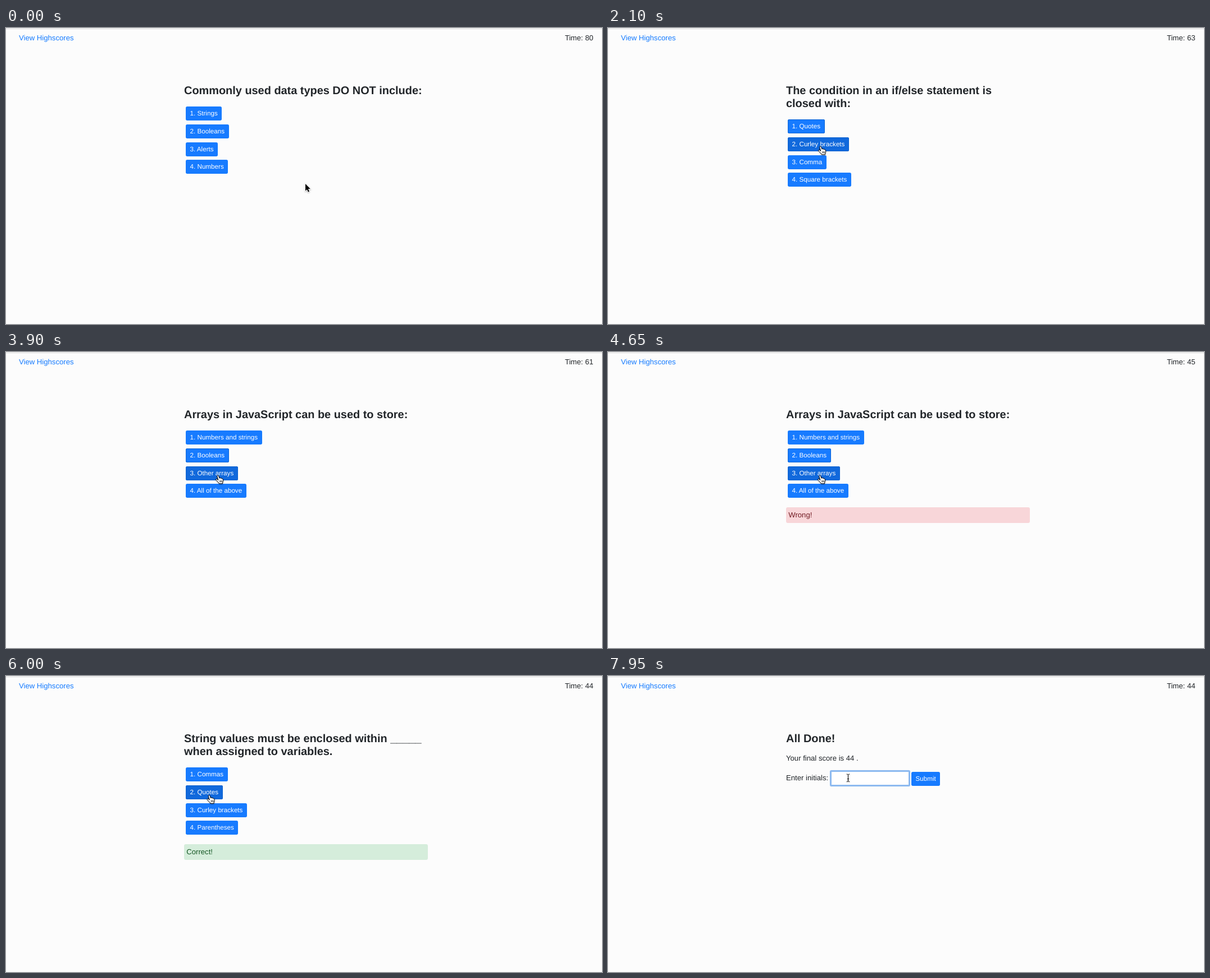
Recreate the animation shown at these times as an HTML page. Size 1061 px wide and 528 px high, loop 8000 ms.

```html
<!DOCTYPE html>
<html lang="en">
<head>
<meta charset="utf-8">
<title>Code quiz</title>
<style>
html, body { margin: 0; width: 100%; height: 100%; overflow: hidden; }
body {
  position: relative; background: #fcfcfc; color: #212529;
  font: 13.14px/20px "Liberation Sans", Arial, sans-serif;
  text-rendering: geometricPrecision;
}
body * { position: absolute; white-space: pre; box-sizing: border-box; }
br { position: static; }
svg * { position: static; }
.rule { top: 1px; width: 100%; height: 1px; background: #d6d6d6; }
.link { left: 23px; top: 7.5px; color: #157bff; }
.timer { right: calc(100% - 1045.5px); top: 7.5px; }
h2 { left: 317px; top: 100.5px; margin: 0; font-size: 19.92px; line-height: 23px; }
.btn {
  left: 320px; height: 25px; padding: 0 7.5px; border-radius: 2.7px;
  background: #177bff; color: #fff; font-size: 11.67px; line-height: 25px;
}
.edge { box-shadow: inset 0 0 0 1px #0f66d6; }
.hover { background: #1169dc; box-shadow: inset 0 0 0 1px #0d62cf; }
.alert {
  left: 317px; width: 434px; height: 28px; padding-left: 4.3px;
  border-radius: 3.3px; line-height: 27px;
}
.wrong { background: #f8d6d9; color: #721c24; }
.right { background: #d5eddb; color: #155724; }
.score { left: 317px; top: 136.5px; }
.label { left: 317px; top: 171.8px; }
.field { left: 397px; top: 170px; width: 139px; height: 25px; background: #fff; border: 1px solid #c9c9c9; }
.ring {
  left: 395px; top: 168px; width: 143px; height: 29px; border: 3px solid #8dbaf0;
  border-radius: 3px; box-shadow: 0 0 1px #a9cbf4; background: #fff;
}
.caret { left: 399px; top: 174px; width: 1px; height: 15px; background: #111; }
.submit { left: 540px; top: 171px; }
svg { left: 0; top: 0; overflow: visible; filter: drop-shadow(0 1px 1px rgba(0, 0, 0, .3)); }
</style>
</head>
<body>
<div class="rule"></div>
<div class="link">View Highscores</div>
<div class="timer"></div>

<div data-on="6300 8000">
  <h2>All Done!</h2>
  <div class="score">Your final score is 44 .</div>
  <div class="label">Enter initials:</div>
  <div class="field"></div>
  <div class="ring" data-on="7350 8000"></div>
  <div class="caret" data-on="7350 7950"></div>
  <div class="btn submit">Submit</div>
</div>

<svg id="arrow" width="16" height="20">
  <path d="M0 0V12.6L2.9 9.9 4.9 14.6 7 13.7 5 9.1H8.9Z" fill="#000" stroke="#fff" stroke-width="1.6" paint-order="stroke"/>
</svg>
<svg id="hand" width="16" height="18">
  <path d="M5 9.3L3.2 3.3Q2.7 1 4 .6 5.3 .4 5.9 2.3L7.1 6Q7.5 4.9 8.6 5.1 9.7 5.3 9.9 6.3 10.6 5.6 11.5 6 12.3 6.4 12.3 7.3 13.3 7 13.7 7.9 14.2 9.6 13.4 12 12.7 13.4 12.7 15.5H6.7Q6 13.7 4 12 1.7 9.9 .9 8.6 .5 7.3 1.8 7 3.2 7.1 5 9.3Z" fill="#fff" stroke="#000"/>
  <path d="M8 9.8V13M9.8 9.8V13M11.6 9.8V13" stroke="#000" stroke-width=".8"/>
</svg>
<svg id="beam" width="8" height="16">
  <path d="M.8 .5Q3.5 .5 3.5 2.2 3.5 .5 6.2 .5M3.5 2V12.5M.8 14Q3.5 14 3.5 12.3 3.5 14 6.2 14M2 9H5" fill="none" stroke="#111"/>
</svg>

<script>
const LOOP = 8000;

const quiz = [
  { on: [0, 1350], lines: ["Commonly used data types DO NOT include:"],
    answers: ["Strings", "Booleans", "Alerts", "Numbers"], alert: ["wrong", 750] },
  { on: [1350, 3000], lines: ["The condition in an if/else statement is", "closed with:"],
    answers: ["Quotes", "Curley brackets", "Comma", "Square brackets"], alert: ["right", 2400] },
  { on: [3000, 4800], lines: ["Arrays in JavaScript can be used to store:"],
    answers: ["Numbers and strings", "Booleans", "Other arrays", "All of the above"], alert: ["wrong", 4200] },
  { on: [4800, 6300], lines: ["String values must be enclosed within _____", "when assigned to variables."],
    answers: ["Commas", "Quotes", "Curley brackets", "Parentheses"], alert: ["right", 5700] }
];

// start, question, answer, state
const states = [
  [600, 0, 0, "hover"], [900, 0, 0, "edge"],
  [1950, 1, 0, "hover"], [2100, 1, 0, "edge"], [2100, 1, 1, "hover"],
  [3150, 2, 2, "hover"], [3750, 2, 1, "edge"],
  [4950, 3, 1, "hover"]
];

// start, seconds left
const ticks = [[0, 80], [600, 79], [750, 64], [1650, 63], [2700, 62], [3600, 61], [4200, 46], [4650, 45], [5700, 44]];

// start, pointer, x, y
const moves = [
  [0, "arrow", 533, 278], [150, "arrow", 522, 269], [300, "arrow", 474, 234], [450, "arrow", 409, 184],
  [600, "hand", 362, 153], [750, "hand", 355.5, 149.5], [1350, "arrow", 360.5, 151],
  [1950, "hand", 368, 175], [2100, "hand", 373.8, 210.3],
  [3600, "hand", 366, 214], [3750, "hand", 359, 228], [3900, "hand", 372.8, 219.3],
  [5400, "hand", 357.3, 211.8], [6450, "arrow", 361, 211.5],
  [6900, "arrow", 386, 198], [7050, "beam", 424, 174.5]
];

function add(parent, cls, text, top) {
  const el = document.createElement("div");
  el.className = cls;
  el.textContent = text;
  if (top !== undefined) el.style.top = top + "px";
  return parent.appendChild(el);
}

const arrow = document.getElementById("arrow");
const buttons = quiz.map(q => {
  const page = document.createElement("div");
  const shift = (q.lines.length - 1) * 23;
  page.dataset.on = q.on.join(" ");
  document.body.insertBefore(page, arrow);

  const head = page.appendChild(document.createElement("h2"));
  head.innerHTML = q.lines.join("<br>");

  const [kind, start] = q.alert;
  const note = add(page, "alert " + kind, kind === "wrong" ? "Wrong!" : "Correct!", 277 + shift);
  note.dataset.on = start + " " + q.on[1];

  return q.answers.map((a, i) => add(page, "btn", `${i + 1}. ${a}`, 140.3 + shift + i * 31.67));
});

const timer = document.querySelector(".timer");
const pointers = [...document.querySelectorAll("svg")];
const timed = [...document.querySelectorAll("[data-on]")].map(el => [el, ...el.dataset.on.split(" ").map(Number)]);
const latest = (list, t) => list.filter(item => item[0] <= t).pop();

function draw() {
  const t = performance.now() % LOOP;
  for (const [el, from, to] of timed) el.style.display = t >= from && t < to ? "" : "none";

  timer.textContent = "Time: " + latest(ticks, t)[1];

  buttons.flat().forEach(b => { b.className = b.className.replace(/ hover| edge/, ""); });
  buttons.forEach((row, q) => row.forEach((b, i) => {
    const state = latest(states.filter(s => s[1] === q && s[2] === i), t);
    if (state) b.className += " " + state[3];
  }));

  const [, shape, x, y] = latest(moves, t);
  for (const p of pointers) {
    p.style.display = p.id === shape ? "" : "none";
    p.style.transform = `translate(${x}px, ${y}px)`;
  }
  requestAnimationFrame(draw);
}
draw();
</script>
</body>
</html>
```
